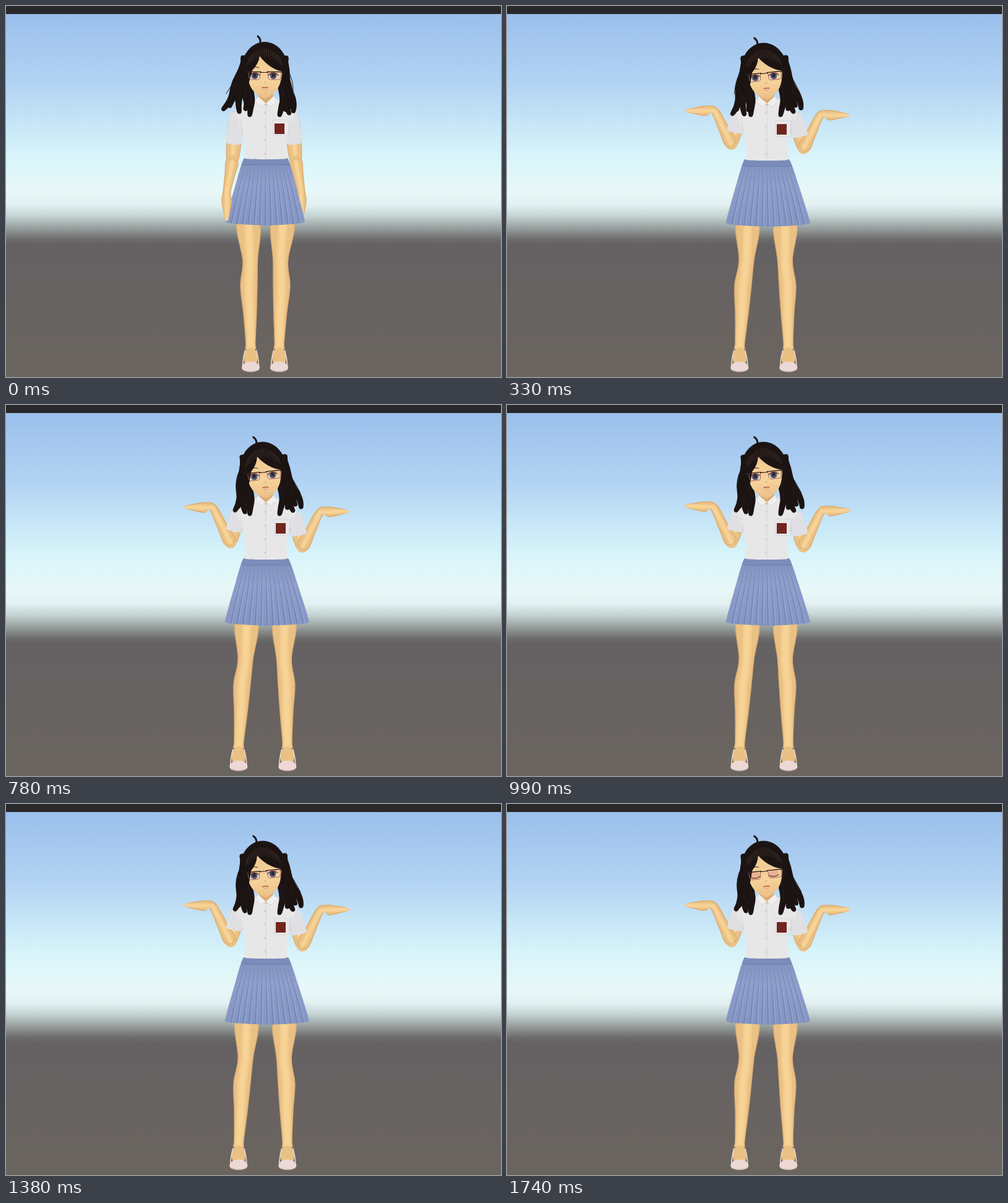
These frames come from a looping animation (800x600 px, 1.77 s). An HTML page with a canvas:

```html
<!DOCTYPE html>
<html lang="en">
<head>
<meta charset="utf-8">
<title>Shrug</title>
<style>
html, body { margin: 0; width: 100%; height: 100%; overflow: hidden; background: #666163; }
canvas { display: block; }
</style>
</head>
<body>
<canvas id="stage" width="800" height="600"></canvas>
<script>
const ctx = document.getElementById('stage').getContext('2d');
const LOOP = 1770, STEP = 30, LEFT = -1, RIGHT = 1;
const SKIN = '#eac184', SKIN_LIGHT = '#f9d79b', SKIN_EDGE = 'rgba(205,150,92,.45)';
const HAIR = '#1b1413', CLOTH = '#e8e7e8', FOLD = '#cfd0d7', RIM = '#33201f';

const clamp = x => Math.max(0, Math.min(1, x));
const smooth = x => { x = clamp(x); return x * x * (3 - 2 * x); };
const mix = (a, b, p) => a + (b - a) * p;
const range = n => Array.from({ length: n }, (_, i) => i);

// Closed smooth curve through points
function trace(pts, k = 1 / 6) {
  const n = pts.length, at = i => pts[(i + n) % n];
  ctx.beginPath();
  ctx.moveTo(...pts[0]);
  for (let i = 0; i < n; i++) {
    const [a, b, c, d] = [at(i - 1), at(i), at(i + 1), at(i + 2)];
    ctx.bezierCurveTo(b[0] + (c[0] - a[0]) * k, b[1] + (c[1] - a[1]) * k,
      c[0] - (d[0] - b[0]) * k, c[1] - (d[1] - b[1]) * k, c[0], c[1]);
  }
  ctx.closePath();
}

function shape(pts, fill, k) {
  trace(pts, k);
  ctx.fillStyle = fill;
  ctx.fill();
}

function oval(x, y, rx, ry, fill) {
  ctx.beginPath();
  ctx.ellipse(x, y, rx, ry, 0, 0, 7);
  ctx.fillStyle = fill;
  ctx.fill();
}

function line(pts, color, width = 1) {
  ctx.beginPath();
  pts.forEach(([x, y]) => ctx.lineTo(x, y));
  ctx.strokeStyle = color;
  ctx.lineWidth = width;
  ctx.stroke();
}

function curve(x1, y1, cx, cy, x2, y2, color, width = 1) {
  ctx.beginPath();
  ctx.moveTo(x1, y1);
  ctx.quadraticCurveTo(cx, cy, x2, y2);
  ctx.strokeStyle = color;
  ctx.lineWidth = width;
  ctx.stroke();
}

function ramp(x1, y1, x2, y2, stops) {
  const g = ctx.createLinearGradient(x1, y1, x2, y2);
  stops.forEach(([at, c]) => g.addColorStop(at, c));
  return g;
}

// Half an outline, centre to centre, completed by its mirror image
const mirror = (half, cx = 0) => [
  ...half.map(([x, y]) => [cx + x, y]),
  ...half.slice().reverse().map(([x, y]) => [cx - x, y])
];

// Outline of a tube along nodes [x, y, half width]
function tube(nodes) {
  const sides = [[], []];
  nodes.forEach(([x, y, w], i) => {
    const a = nodes[Math.max(0, i - 1)], b = nodes[Math.min(nodes.length - 1, i + 1)];
    const dx = b[0] - a[0], dy = b[1] - a[1], d = Math.hypot(dx, dy);
    sides[0].push([x - dy / d * w, y + dx / d * w]);
    sides[1].unshift([x + dy / d * w, y - dx / d * w]);
  });
  return [...sides[0], ...sides[1]];
}

// Skin tube, lighter along the middle
function limb(nodes, band) {
  ctx.save();
  shape(tube(nodes), SKIN);
  ctx.clip();
  ctx.strokeStyle = SKIN_EDGE;
  ctx.lineWidth = 3;
  ctx.stroke();
  ctx.globalAlpha = 0.4;
  for (const w of [1, 0.7, 0.4]) line(nodes, SKIN_LIGHT, band * w);
  ctx.restore();
}

const SKY = ramp(0, 0, 0, 600, [
  [13, '#9bbfec'], [130, '#b3d4f3'], [240, '#d7f4fa'], [300, '#e8f8f8'], [322, '#e2f0f1'],
  [340, '#c3d2d2'], [360, '#969d9c'], [378, '#6c6b6b'], [386, '#656163'], [600, '#6b655f']
].map(([y, c]) => [y / 600, c]));

function backdrop() {
  ctx.fillStyle = SKY;
  ctx.fillRect(0, 0, 800, 600);
  ctx.fillStyle = '#29282b';
  ctx.fillRect(0, 0, 800, 13);
}

function leg(side, p) {
  const hip = 419.5 + side * mix(28, 30.5, p);
  const foot = mix(418.5, 415.3, p) + side * mix(23, 39.5, p);
  const node = (u, bend, w) => [mix(hip, foot, u) + side * bend, 350 + 205 * u, w];
  limb([node(0, 0, 18.5), node(0.3, -2, 12.5), node(0.5, 1, 14), node(0.72, 0, 11), node(0.95, 0, 8), node(1, 0, 8)], 15);
  oval(foot, 569, 11, 17, SKIN);
  for (const s of [LEFT, RIGHT]) curve(foot + s * 13, 583, foot + s * 13, 572, foot + s * 9, 557, '#ecd2c6', 1.8);
  ctx.beginPath();
  ctx.ellipse(foot, 585, 14.5, 10, 0, Math.PI, 0);
  ctx.ellipse(foot, 585, 14.5, 7, 0, 0, Math.PI);
  ctx.fillStyle = '#ecd9d6';
  ctx.fill();
  curve(foot - 12, 589, foot, 593, foot + 12, 589, '#cdb6b2', 1.3);
}

// Angles turn outward from straight down
function arm(side, p, lift) {
  const step = ([x, y], deg, len) => {
    const a = deg * Math.PI / 180;
    return [x + side * Math.sin(a) * len, y + Math.cos(a) * len];
  };
  const shoulder = [mix(417, 421, p) + side * mix(45, 46, p), mix(179, 177 + side * 3.5, p)];
  const elbow = step(shoulder, mix(5, 14, p), mix(72, 51, p) - lift);
  const reach = 1 - 0.22 * Math.sin(Math.PI * p);
  const bend = mix(10, 153, p), turn = mix(0, 90, p) + 2 * lift;
  const fore = (mix(51, 60, p) + 4 * lift) * reach, hand = 45 * reach;
  const wrist = step(elbow, bend, fore);
  return {
    shoulder, elbow,
    cuff: [mix(shoulder[0], elbow[0], 0.6), mix(shoulder[1], elbow[1], 0.6)],
    draw() {
      limb([[...shoulder, 10], [...elbow, 9.5]], 9);
      oval(...elbow, 9.5, 9.5, SKIN);
      limb([[...elbow, 9.5], [...step(elbow, bend, fore * 0.45), 8.5], [...wrist, 6.5],
        [...step(wrist, turn, hand * 0.3), 8.5], [...step(wrist, turn, hand * 0.65), 6], [...step(wrist, turn, hand), 2]], 8);
    }
  };
}

function skirt(p) {
  const waist = mix(34.5, 35.5, p), hem = mix(64, 68, p), cx = mix(419, 422, p);
  const top = mix(246, 248, p), low = mix(355, 357, p);
  const hemY = u => low - 6 * u * u;
  const at = (u, v) => [mix(420, cx, v) + u * mix(waist, hem, v), mix(top, hemY(u), v)];
  ctx.save();
  shape([at(-1, 0), at(-1.04, 0.35), at(-1, 1), at(-0.5, 1), at(0, 1), at(0.5, 1), at(1, 1), at(1.04, 0.35), at(1, 0)],
    ramp(0, top, 0, low, [[0, '#8090bd'], [0.4, '#8e9ecb'], [1, '#8495c2']]), 0.04);
  ctx.clip();
  for (const i of range(13)) {
    const u = (i - 6) / 7;
    const pleat = (shift, color) => curve(...at(u, 0.1), ...at(u + shift + u * 0.06, 0.5), ...at(u + shift, 1.02), color, 1.5);
    pleat(0, 'rgba(98,113,158,.5)');
    pleat(0.04, 'rgba(170,184,222,.35)');
  }
  ctx.fillStyle = '#7c8cb9';
  ctx.fillRect(380, top, 80, 11);
  line([[382, top + 11], [460, top + 11]], '#6d7dab');
  ctx.restore();
}

function shirt(p, arms) {
  const waist = mix(247, 249, p);
  for (const { shoulder, cuff } of arms) {
    shape(tube([[shoulder[0], shoulder[1] - 5, 9], [...cuff, 12]]), '#e0e0e4', 0.06);
  }
  shape(mirror([[15, 150], [34, 158], [50, 168], [39, 200], [33, 226], [33, waist]], 420), CLOTH, 0.06);
  for (const s of [LEFT, RIGHT]) line([[420 + s * 37, 205], [420 + s * 42, 182]], FOLD);
  line([[420, 160], [420, waist]], FOLD);
  for (const i of range(4)) oval(418.5, 173 + i * 22, 1.2, 1.2, '#c3c4cc');
  const x = mix(432, 434, p), y = mix(184, 185, p);
  ctx.strokeStyle = '#d5d6dc';
  ctx.strokeRect(x, y, 25, 26);
  ctx.fillStyle = '#71251f';
  ctx.fillRect(x + 2, y + 6, 16, 17);
}

function neck() {
  shape([[408, 138], [408, 152], [420, 161], [431, 152], [431, 138]], '#dcae74', 0.05);
  for (const s of [LEFT, RIGHT]) {
    const flap = [[420 + s * 13, 146], [420 + s * 16, 156], [420 + s * 8, 163], [420, 158]];
    shape(flap, '#f0eff0', 0.02);
    line(flap.slice(1), FOLD, 0.8);
  }
}

// Wavy strands fanned from the temple; the tips swing out, then settle
function locks(side, p, q) {
  const out = side === LEFT
    ? { x: mix(mix(352, 355, p), 371, q), y: mix(mix(168, 183, p), 172, q) }
    : { x: mix(mix(466, 474, p), 479, q), y: mix(mix(172, 168, p), 167, q) };
  const inner = 421 + side * 24, root = mix(418, 416, p) + side * 29;
  for (const i of range(5)) {
    const f = i / 4, tipX = mix(out.x, inner, f), tipY = mix(out.y, 178, f) - (i % 2) * 7;
    const nodes = range(9).map(j => {
      const u = j / 8;
      const wave = Math.sin(u * 10 + i * 1.8) * 3.2 * u;
      return [mix(root, tipX, Math.pow(u, 1.2)) + wave, mix(82, tipY, u), 3 + 5 * Math.sqrt(1 - u)];
    });
    shape(tube(nodes), HAIR);
    line(nodes.slice(2, 7), 'rgba(70,52,46,.35)');
  }
  curve(root + side * 8, 104, root + side * 18, 118, mix(root, out.x, 0.9), 142, HAIR);
}

function eye(x, open) {
  oval(x, 0, 8, 6.2, '#eab295');
  ctx.save();
  ctx.beginPath();
  ctx.ellipse(x, 1.5, 8, 5.4 * open, 0, 0, 7);
  ctx.clip();
  oval(x, 1, 8, 7, '#e6d9d6');
  oval(x, 0.8, 5.4, 5.6, '#5b5a69');
  oval(x, 0, 2.8, 3.4, '#2b2935');
  ctx.restore();
  const y = mix(3, 0, open);
  curve(x - 8, y, x, mix(7, -7.5, open), x + 8, y, '#5b3833', 1.3);
}

function lens(x, w) {
  line([[x, -5], [x + 1, 5], [x + 3, 7], [x + w - 3, 7], [x + w - 1, 5], [x + w, -5]], '#a0605a', 0.9);
  line([[x - 1, -5.5], [x + w + 1, -5.5]], RIM, 1.4);
}

function fringe() {
  ctx.beginPath();
  ctx.ellipse(0, -8, 38, 46, 0, Math.PI, 0);
  ctx.quadraticCurveTo(40, 12, 37, 26);
  ctx.quadraticCurveTo(28, 16, 29, -6);
  ctx.quadraticCurveTo(8, -10, -8, -31);
  ctx.quadraticCurveTo(-10, -18, -20, -8);
  ctx.quadraticCurveTo(-24, 8, -30, 26);
  ctx.quadraticCurveTo(-39, 12, -38, -8);
  ctx.fillStyle = HAIR;
  ctx.fill();
  for (const i of range(17)) {
    const x = (i - 8) * 3.5, y = -38 + x * x * 0.018;
    curve(x * 0.85, y - 5, x * 0.95, y, x, y + 7 + i % 3, 'rgba(92,67,57,.45)', 1.3);
  }
}

function head(p, open) {
  ctx.save();
  ctx.translate(mix(418, 417, p), mix(112, 113.5, p));
  ctx.rotate(-0.1 * p);
  shape(mirror([[11, -36], [27, -10], [26, 9], [20, 23], [9, 33], [1, 37]]),
    ramp(0, -30, 0, 38, [[0, '#f0cb94'], [0.6, '#f6d19a'], [1, '#eabf86']]));
  eye(-16, open);
  eye(14, open);
  curve(-23, -11, -16, -15, -9, -12, '#6b4535', 1.2);
  curve(-0.5, 11, 1, 12.5, 2, 11, '#d99c6c');
  curve(-4, 20, 0, 19, 5, 20, '#b8584d', 1.5);
  curve(-2.5, 22.5, 0.5, 23.5, 3.5, 22.5, '#e59a83', 1.2);
  fringe();
  lens(-26, 19);
  lens(5, 22);
  line([[-7, -4.5], [5, -4.5]], RIM, 1.2);
  line([[-31, -6], [-26, -5]], RIM, 1.3);
  line([[27, -5], [32, -3]], RIM, 1.3);
  curve(-7, -52, -6, -59, -11, -63, HAIR, 3);
  ctx.restore();
}

function draw(t) {
  const p = 1 - Math.pow(1 - clamp(t / 150), 1.5);
  const settle = smooth((t - 150) / 300);
  const lift = smooth((t - 450) / 500);
  const open = 1 - clamp((t - 1650) / 90);
  const sides = [LEFT, RIGHT], arms = sides.map(s => arm(s, p, lift));
  ctx.lineCap = ctx.lineJoin = 'round';
  backdrop();
  sides.forEach(s => leg(s, p));
  arms[1].draw();
  skirt(p);
  arms[0].draw();
  shirt(p, arms);
  neck();
  sides.forEach(s => locks(s, p, settle));
  head(p, open);
}

const start = performance.now();
function tick() {
  const t = (performance.now() - start) % LOOP;
  draw(Math.floor(t / STEP) * STEP);
  requestAnimationFrame(tick);
}
tick();
</script>
</body>
</html>
```
